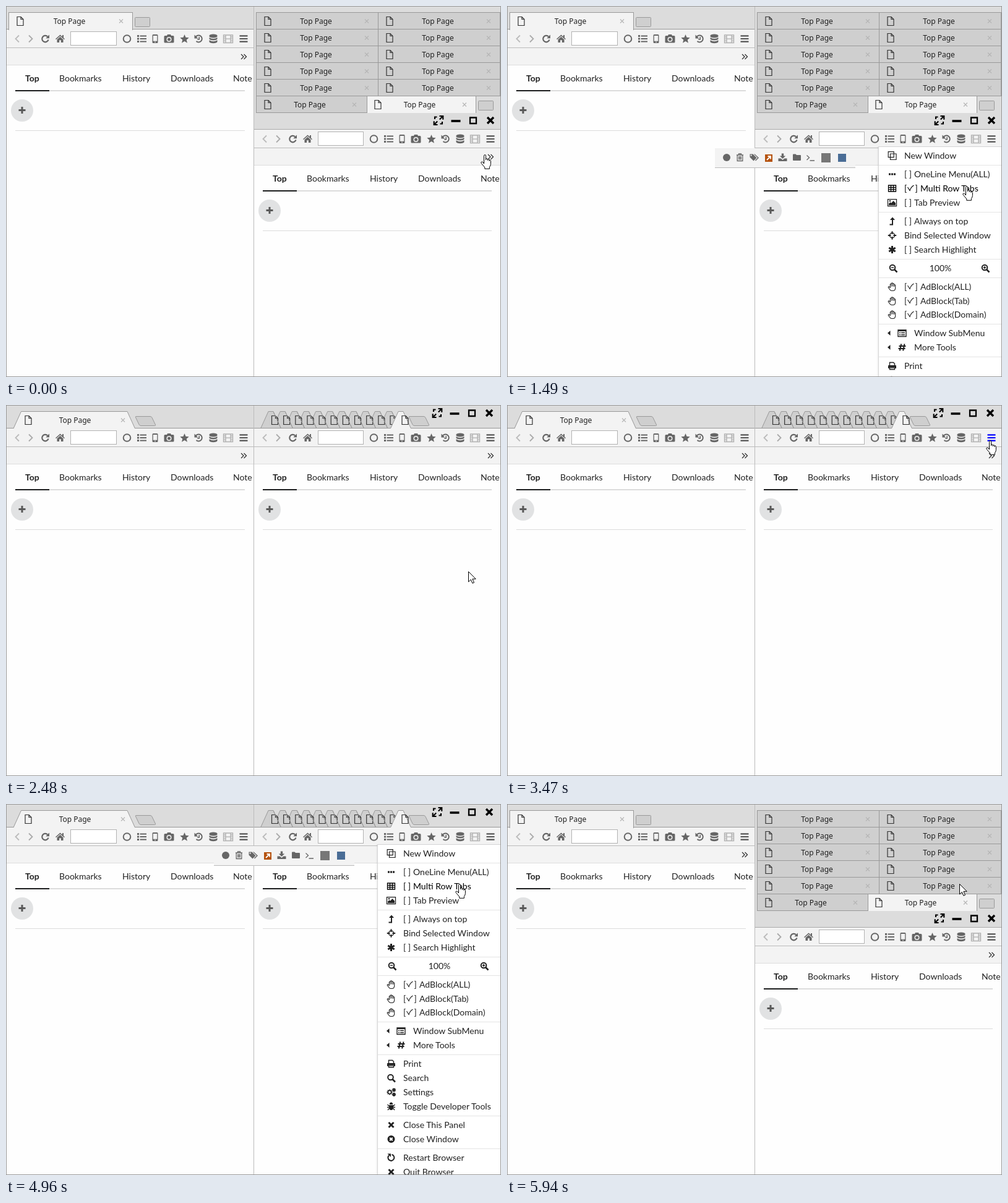
Write an HTML page that moves like this. It is 800x600 px and loops after 6.96 s.

```html
<!DOCTYPE html>
<html lang="en">
<head>
<meta charset="utf-8">
<title>Tab bar layouts</title>
<style>
html, body { margin: 0; width: 100%; height: 100%; overflow: hidden; background: #fefefe; }
svg { display: block; width: 800px; height: 600px; font: 14px Lato, sans-serif; }
.title { font: 12px "Noto Sans", sans-serif; }
text { white-space: pre; }
</style>
</head>
<body>
<svg id="stage" viewBox="0 0 800 600"></svg>
<script>
const stage = document.getElementById("stage");
const LOOP = 6960, INK = "#212121", EDGE = "#999", BAR = "#f3f3f3", TAB = "#cfcfcf", STRIP = "#dcdcdc";

// start, stacked tabs, menu open, menu button lit, hovered row, cursor, x, y
const STEPS = [
  [0, 1, 0, 0, -1, "hand", 767, 240],
  [500, 1, 1, 1, -1, "hand", 777, 225],
  [990, 1, 1, 0, 0, "hand", 761, 249],
  [1490, 1, 1, 0, 2, "hand", 736, 291],
  [1990, 1, 0, 0, -1, "hand", 736, 291],
  [2480, 0, 0, 0, -1, "arrow", 747.5, 269.5],
  [2970, 0, 0, 0, -1, "hand", 783, 101],
  [3470, 0, 0, 1, -1, "hand", 774, 57],
  [3970, 0, 1, 1, -1, "hand", 774, 57],
  [4460, 0, 1, 0, 1, "hand", 761, 117],
  [4960, 0, 1, 0, 2, "hand", 726, 129],
  [5470, 0, 0, 0, -1, "hand", 726, 129],
  [5940, 1, 0, 0, -1, "arrow", 731.5, 129.5]
];

const rect = (x, y, w, h, fill) => `<rect x="${x}" y="${y}" width="${w}" height="${h}" fill="${fill}"/>`;
const box = (x, y, w, h, fill, line = EDGE, r = 0) =>
  `<rect x="${x + .5}" y="${y + .5}" width="${w}" height="${h}" rx="${r}" fill="${fill}" stroke="${line}"/>`;
const shape = (d, fill, line = EDGE) => `<path d="${d}" fill="${fill}" stroke="${line}" stroke-linejoin="round"/>`;
const label = (s, x, y, extra = "", fill = INK) => `<text x="${x}" y="${y}" fill="${fill}" ${extra}>${s}</text>`;
const ring = (r, x = 0, y = 0) => `M${x - r} ${y}a${r} ${r} 0 1 0 ${2 * r} 0a${r} ${r} 0 1 0 ${-2 * r} 0z`;
const star = Array.from({ length: 10 }, (_, i) => {
  const a = i * Math.PI / 5, r = i % 2 ? 3.4 : 7.6;
  return `${i ? "L" : "M"}${(r * Math.sin(a)).toFixed(1)} ${(.6 - r * Math.cos(a)).toFixed(1)}`;
}).join("") + "z";
const rays = (n, a, b) => Array.from({ length: n }, (_, i) => {
  const t = i * 2 * Math.PI / n, c = Math.cos(t), s = Math.sin(t);
  return `M${c * a} ${s * a}L${c * b} ${s * b}`;
}).join("");
const gear = (x, y, r) => `<g transform="translate(${x} ${y})">${draw([ring(r), 1.8], [rays(8, r, r + 1.8), 1.5])}</g>`;

// Each part is [path, stroke width]; width 0 means filled.
function draw(...parts) {
  return parts.map(([d, w]) => w
    ? `<path d="${d}" fill="none" stroke="currentColor" stroke-width="${w}"/>`
    : `<path d="${d}" fill="currentColor" fill-rule="evenodd"/>`).join("");
}

const lens = [ring(4.3, -1, -1), 2], handle = ["M2 2l4.5 4.5", 2.5];
const ICONS = {
  file: draw(["M-5-7h6l4 4v10h-10zM1-7v4h4", 1.2]),
  close: draw(["M-3-3l6 6m0-6l-6 6", 1.1]),
  back: draw(["M3-5.5l-5.5 5.5 5.5 5.5", 1.8]),
  forward: draw(["M-3-5.5l5.5 5.5-5.5 5.5", 1.8]),
  reload: draw(["M3.6-3.6A5.2 5.2 0 1 0 5 1.5", 2.2], ["M6.5-6.5v5.7h-5.7z", 0]),
  home: draw(["M-7.5 .2L0-6.5 3.5-3.4V-6h2v4.4L7.5 .2l-1 1L0-4.6l-6.5 5.8zM-5 1.2L0-3.2 5 1.2V6H1.4V2.3h-2.8V6H-5z", 0]),
  circle: draw([ring(5.8), 2]),
  list: draw(["M-7.5-4.5h3m-3 4.5h3m-3 4.5h3", 3], ["M-3-4.5H7.5M-3 0H7.5M-3 4.5H7.5", 2.2]),
  mobile: draw(["M-3-7h6q1.5 0 1.5 1.5v11q0 1.5-1.5 1.5h-6q-1.5 0-1.5-1.5v-11q0-1.5 1.5-1.5zM-3.2-5v8.7h6.4v-8.7z" + ring(.8, 0, 5.4), 0]),
  camera: draw(["M-6.5-5h3l1-2h5l1 2h3q1.5 0 1.5 1.5v8.5q0 1.5-1.5 1.5h-13q-1.5 0-1.5-1.5v-8.5q0-1.5 1.5-1.5z" + ring(4, 0, 1) + ring(2.5, 0, 1), 0]),
  star: draw([star, 0]),
  history: draw(["M-4.6-3.4A5.5 5.5 0 1 1-4 4", 2], ["M-7-6.5v6h6z", 0], ["M.7-3v4h-3", 1.6]),
  database: draw(["M-6.5-5a6.5 2.5 0 0 1 13 0v1a6.5 2.5 0 0 1-13 0zM-6.5-2q6.5 4 13 0v2a6.5 2.5 0 0 1-13 0zM-6.5 2.3q6.5 4 13 0v2.4a6.5 2.5 0 0 1-13 0z", 0]),
  film: draw(["M-7.5-6h15v12.5h-15zM-4-6v12.5M4-6v12.5M-4 .2H4M-7.5-3h3.5m-3.5 3.2h3.5m-3.5 3.2h3.5M4-3h3.5M4 .2h3.5M4 3.4h3.5", 1.3]),
  bars: draw(["M-6.5-4.7h13M-6.5 0h13M-6.5 4.7h13", 2.2]),
  more: draw(["M-4-4l4 4-4 4M.5-4l4 4-4 4", 1.3]),
  plus: draw(["M-5.5 0h11M0-5.5v11", 3]),
  expand: draw(["M1.5-7h5.8v5.8M6.5-6.2L1.8-1.5M-1.5 7h-5.8v-5.8M-6.5 6.2L-1.8 1.5M-6-2v-3.5h3.5M6 2v3.5h-3.5", 2.1]),
  minus: draw(["M-7.5 1h15", 3.6]),
  square: draw(["M-5-4.5h10v9.5h-10z", 2.3]),
  cross: draw(["M-5-5l10 10m0-10l-10 10", 3.4]),
  dot: draw([ring(6), 0]),
  trash: draw(["M-5.5-4h11M-2-4v-2h4v2M-4.3-4v9.5h8.6v-9.5M-1.8-2v5.5M0-2v5.5M1.8-2v5.5", 1.3]),
  tags: draw(["M-7-5.5h5l6 6-5 5-6-6z" + ring(1.1, -4.8, -3.3) + "M-.5-5.5h1.5l6.5 6-5 5-1-1 4-4z", 0]),
  download: draw(["M-1.7-6.5h3.4v4h3l-4.7 4.5-4.7-4.5h3zM-7 1.5h4l3 2.5 3-2.5h4v4.5h-14z", 0]),
  folder: draw(["M-6.5-4.5q0-1 1-1h3.5l1.5 1.5h6q1 0 1 1v7q0 1-1 1h-11q-1 0-1-1z", 0]),
  terminal: draw(["M-6-3.5l4 3.7-4 3.7M-1 5h7.5", 1.3]),
  clone: draw(["M-6.3-6.3h9v9h-9zM-3-3h9.5v9.5h-9.5z", 1.2]).replace(/z/, "zM-3 2.7"),
  dots: draw(["M-5.5 0h3m1 0h3m1 0h3", 2.8]),
  table: draw(["M-6-5h12v10h-12zM-6-1.5h12M-6 1.7h12M-2-5v10M2-5v10", 1.3]),
  image: draw(["M-7-5.3h14v11h-14z", 1.3], ["M-5.5 4.2v-2.5l2.5-2.5 1.5 1.5 3.5-3.7 3.5 3.7v3.5z" + ring(1.3, -3.5, -2.7), 0]),
  up: draw(["M-4 5.5h4.5v-8", 2], ["M.5-6.5l4 4.6h-8z", 0]),
  aim: draw([ring(4), 1.5], [rays(4, 2, 6.7), 1.8]),
  asterisk: draw(["M0-6v12M-5.2-3l10.4 6M5.2-3l-10.4 6", 3]),
  zoomOut: draw(lens, handle, ["M-3.2-1h4.4", 1.4]),
  zoomIn: draw(lens, handle, ["M-3.2-1h4.4M-1-3.2v4.4", 1.4]),
  search: draw(lens, handle),
  palm: draw(["M-3.2 1.5v-5q0-1.2 1-1.2t1 1.2v3.2-4.6q0-1.2 1.1-1.2t1.1 1.2v4.4-3.6q0-1.1 1.1-1.1t1.1 1.1v4-2.2q0-1 1-1t1 1v4q0 4.8-4 4.8h-1.8q-2 0-3.3-2l-2.3-3.3q-.3-1.2.8-1.3z", 1.1]),
  caret: draw(["M2-4v8l-4.5-4z", 0]),
  listAlt: draw(["M-6.5-5h13v10.5h-13z", 1.4], ["M-6.5-4h13", 2.2], ["M-4.5-.5h2M-4.5 2.8h2M-1.5-.5h6M-1.5 2.8h6", 1.4]),
  hash: draw(["M-1.3-5.5l-2.4 11M4-5.5l-2.4 11M-5-2h11M-6 2h11", 2]),
  print: draw(["M-4-.5v-5h6l2 2v3M-4 3h8v2.7h-8z", 1.4], ["M-6.5 0q0-1 1-1h11q1 0 1 1v4h-2v-2h-9v2h-2z", 0]),
  cogs: gear(-2.5, 0, 2.8) + gear(4.5, -3.5, 1.3) + gear(4.5, 3.8, 1.3),
  bug: draw(["M-3.5-2h7v4q0 4-3.5 4t-3.5-4zM-2.7-3q0-3.5 2.7-3.5t2.7 3.5z", 0], ["M-3.5-.5l-2.5-2.5M3.5-.5l2.5-2.5M-6.5 1.5h13M-3.5 3.5l-2 2.5M3.5 3.5l2 2.5", 1.3]),
  times: draw(["M-4-4l8 8m0-8l-8 8", 2.9]),
  timesDot: draw([ring(6) + "M-3-1.5l1.5 1.5-1.5 1.5 1.5 1.5 1.5-1.5 1.5 1.5 1.5-1.5-1.5-1.5 1.5-1.5-1.5-1.5-1.5 1.5-1.5-1.5z", 0]),
  undo: draw(["M-3.5-3.8A5 5 0 1 0 1-5", 2], ["M-6-6.5h5.5v5.5z", 0])
};
const icon = (name, x, y, color = "#666") => `<g transform="translate(${x} ${y})" color="${color}">${ICONS[name]}</g>`;

const CURSORS = {
  hand: "M5.5 15V2.3q0-1.6 1.5-1.6t1.5 1.6V9V7.8q0-1 1.3-1t1.5 1V9.6V8.8q0-1 1.3-1t1.4 1V10.5V10q0-1 1.1-1t1.3 1.4V15.5q0 2.5-2 5V23.3H6.8V21L1.3 14.5q-1.2-1.8.2-2.4t2.5.8z",
  arrow: "M0 0V16.5L3.8 12.8 6.4 18.8 9 17.7 6.4 11.8H11.7z"
};

const title = (x, y) => label("Top Page", x, y, 'class="title" text-anchor="middle"');
const tabContent = (x, mid, closeX, y) =>
  icon("file", x, y, "#333") + title(mid, y + 4.5) + icon("close", closeX, y, "#b5b5b5");

function windowButtons(x, y) {
  return ["expand", "minus", "square", "cross"].map((n, i) => icon(n, x + 28 * i, y, "#000")).join("");
}

// Toolbar, bookmark bar and page below the tab strip.
function panel(x, y, right, lit) {
  const shift = right ? x - 1 : x, mid = y + 15;
  const tools = { 195.5: "circle", 219.5: "list", 241: "mobile", 263.5: "camera", 288.5: "star", 311.5: "history", 335: "database", 359: "film" };
  let s = rect(x, y, 400, 58, BAR) + rect(x, y + 29, 400, 1, "#bbb") + rect(x, y + 57, 400, 1, "#ddd")
    + rect(x, y + 58, 400, 600, "#fefefe")
    + icon("back", x + 18, mid, "#bbb") + icon("forward", x + 40, mid, "#aaa")
    + icon("reload", x + 63.5, mid) + icon("home", x + 87.5, mid)
    + box(x + 104, y + 3, right ? 73 : 74, 22, "#fff", "#b3b3b3");
  for (const at in tools) s += icon(tools[at], shift + +at, mid, tools[at] === "film" ? "#b0b0b0" : "#666");
  s += icon("bars", shift + 384, mid, lit ? "#00f" : "#555") + icon("more", shift + 384, y + 44, "#333")
    + rect(x + 15, y + 98, right ? 370 : 371, 2, "#dcdcdc") + rect(x + 15, y + 98, 55, 2, "#1b1c1d")
    + label("Top", x + 31, y + 84, 'font-weight="bold"');
  const names = { 86: "Bookmarks", 188: "History", 266: "Downloads", 367: "Note" };
  for (const at in names) s += label(names[at], x + +at, y + 84);
  return s + `<circle cx="${x + 26}" cy="${y + 131}" r="18" fill="#e1e2e3"/>` + icon("plus", x + 26, y + 130.5, "#595959")
    + rect(x + 15, y + 163, right ? 370 : 371, 1, "#dcdcdc");
}

function stackedTabs() {
  let s = rect(0, 37, 400, 1, EDGE) + rect(401, 199, 399, 1, "#aaa")
    + box(4, 10, 200, 28, BAR) + rect(5, 37, 199, 2, BAR) + tabContent(23, 102.5, 186, 24.5)
    + box(208, 18, 24, 15, TAB, EDGE, 1);
  for (let row = 0; row < 5; row++) for (let col = 0; col < 2; col++) {
    const x = 404 + 197 * col, y = 10 + 27 * row;
    s += box(x, y, 197, 27, TAB) + tabContent(x + 19, x + 97, x + 179, y + 14.5);
  }
  return s + box(404, 145, 179, 27, TAB) + tabContent(423, 491, 563, 159.5)
    + shape("M583.5 173V145.5H759.5V173", BAR) + tabContent(601, 668.5, 741, 159.5)
    + box(763, 153, 24, 15, TAB, EDGE, 1) + windowButtons(699, 185);
}

function slantedTabs() {
  const tab = (x, top, fill) => shape(`M${x} 38L${x + 12.5} 10.5h${top}L${x + 25 + top} 38`, fill);
  const adder = x => shape(`M${x} 18.5h23q2 0 3 2l5.5 11.5q.5 1.5-1 1.5h-22.5q-2 0-3-2l-5.5-11.5q-.5-1.5 .5-1.5z`, TAB);
  const step = 19.15;
  let s = "";
  for (let i = 10; i >= 0; i--) s += tab(411.5 + i * step, 8, TAB);
  for (let i = 0; i < 11; i++) s += icon("file", 434.5 + i * step, 24.5, "#333");
  for (let i = 0; i < 11; i++) s += shape(`M${432 + i * step} 10.5L${444.5 + i * step} 38`, "none");
  return s + rect(0, 37, 800, 1, EDGE) + tab(12, 171.5, BAR) + rect(13, 37, 194, 1, BAR)
    + tabContent(36, 111.5, 189, 24.5) + adder(210)
    + adder(652) + tab(621.5, 8, BAR) + rect(622.5, 37, 31, 1, BAR)
    + icon("file", 645, 24.5, "#333") + windowButtons(697, 13);
}

// A leading "-" starts a new section; "!" and "?" are on and off check boxes.
const ROWS = [
  "clone:New Window", "-dots:?OneLine Menu(ALL)", "table:?Multi Row Tabs", "image:?Tab Preview",
  "-up:?Always on top", "aim:Bind Selected Window", "asterisk:?Search Highlight", "-zoom:",
  "-palm:!AdBlock(ALL)", "palm:!AdBlock(Tab)", "palm:!AdBlock(Domain)",
  "-listAlt:>Window SubMenu", "hash:>More Tools",
  "-print:Print", "search:Search", "cogs:Settings", "bug:Toggle Developer Tools",
  "-times:Close This Panel", "timesDot:Close Window", "-undo:Restart Browser", "times:Quit Browser"
];

function menu(stacked, hover) {
  let s = rect(598, 65, 2, 540, "#0000000a") + box(600, 65, 199, 600, "#fff", "#d4d4d5"), y = 80;
  ROWS.forEach((row, i) => {
    const split = row[0] === "-";
    let [name, text] = row.slice(split).split(":");
    if (i) y += split ? 29.98 : 22.92;
    const at = Math.round(y), ink = i === hover ? "#000" : INK, base = at + 5;
    if (split) s += rect(601, at - 15, 198, 1, "#e4e4e4");
    if (name === "zoom") {
      s += icon("zoomOut", 624, at, ink) + label("100%", 700.5, base, 'text-anchor="middle"') + icon("zoomIn", 773, at, ink);
      return;
    }
    if (stacked && i === 2) text = text.replace("?", "!");
    const mark = text[0], rest = text.slice(1);
    s += icon(name, mark === ">" ? 638.5 : 622.5, at, ink);
    if (mark === ">") s += icon("caret", 617.5, at, ink) + label(rest, 658, base, "", ink);
    else if (mark === "?") s += label("[ ]", 642, base, "", ink) + label(rest, 658, base, "", ink);
    else if (mark === "!") s += label("[", 642, base, "", ink) + label("]", 659.5, base, "", ink) + label(rest, 668, base, "", ink)
      + `<path d="M647.5 ${at - 2}l3.5 5.5q2-6 6.5-8.5" fill="none" stroke="${ink}" stroke-width="1.1"/>`;
    else s += label(text, 642, base, "", ink);
  });
  const tray = { 355: "dot", 376.5: "trash", 399.5: "tags", 445.5: "download", 468.5: "folder", 490.5: "terminal" };
  s += rect(336, 68, 227, 32, BAR) + rect(336, 99, 227, 1, "#bbb");
  for (const at in tray) s += icon(tray[at], at, 83);
  return s + rect(417, 78, 12, 12, "#b5530f")
    + '<path d="M420 87l5.5-5.5M421.5 81h4.5v4.5" fill="none" stroke="#fff" stroke-width="1.8"/>'
    + rect(508, 76, 15, 15, "#777") + rect(535, 77, 13, 13, "#4a6d96");
}

function scene([, stacked, open, lit, hover, cursor, x, y]) {
  const drop = stacked ? 162 : 0;
  return rect(0, 0, 800, 600, STRIP) + panel(0, 38, false) + panel(400, 38 + drop, true, lit)
    + (stacked ? stackedTabs() : slantedTabs()) + rect(400, 0, 1, 600, "#bbb")
    + (open ? `<g transform="translate(0 ${drop})">${menu(stacked, hover)}</g>` : "")
    + box(0, 0, 799, 599, "none")
    + `<g transform="translate(${x} ${y})">${shape(CURSORS[cursor], "#fff", "#000")}</g>`;
}

let shown;
function tick() {
  const t = performance.now() % LOOP, step = STEPS.findLast(s => s[0] <= t);
  if (step !== shown) stage.innerHTML = scene(shown = step);
  requestAnimationFrame(tick);
}
tick();
</script>
</body>
</html>
```
